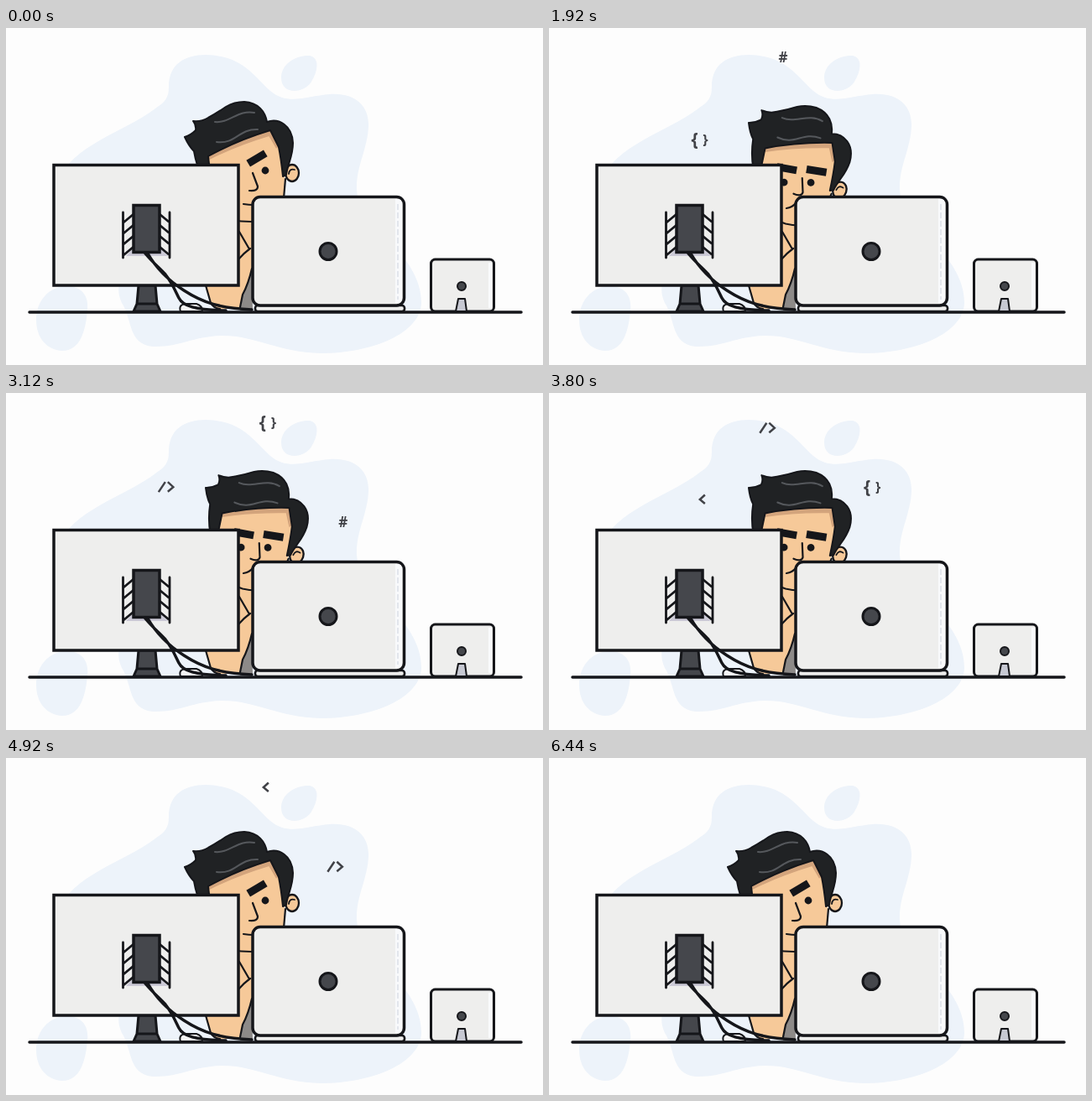
An HTML page for the animation above (6.48 s loop, 640x402 px).

```html
<!DOCTYPE html>
<html lang="en">
<head>
<meta charset="utf-8">
<title>Coding at the desk</title>
<style>
  html, body { margin: 0; width: 100%; height: 100%; overflow: hidden; background: #fdfdfd; }
  svg { display: block; width: 100%; height: 100%; }
  .blob { fill: #edf3fa; }
  .ink { stroke: #15161a; stroke-width: 3.5; stroke-linejoin: round; stroke-linecap: round; }
  .sharp { stroke-linejoin: miter; }
  .line { fill: none; stroke-width: 2.2; }
  .thin { stroke-width: 2; }
  .panel { fill: #eeeeed; }
  .dark { fill: #45474c; }
  .skin { fill: #f6c999; }
  .hair { fill: #202224; stroke-width: 2; }
  .strand { fill: none; stroke: #55585c; stroke-width: 2; stroke-linecap: round; }
  .symbol { fill: #414247; font: bold 17px "Open Sans", sans-serif; text-anchor: middle; }
  .symbol path { fill: none; stroke: #414247; stroke-width: 2.5; }
  .symbol .open { font-size: 21px; }
  .symbol .close { font-size: 16px; }
</style>
</head>
<body>
<svg viewBox="0 0 640 402">
  <g class="blob">
    <path d="M194 70C194 43 213 32 238 32C282 33 295 57 315 75C336 93 358 81 386 79C416 77 433 93 432 117C431 145 417 165 418 193C420 236 495 268 495 328C494 364 437 388 375 388C325 387 298 367 258 367C222 368 207 381 175 380C145 377 151 348 138 328C125 300 150 285 140 260L60 185C80 138 140 125 178 96C190 88 194 83 194 70Z"/>
    <path d="M328 59C328 42 347 32 362 33C375 36 371 53 364 64C356 78 328 81 328 59Z"/>
    <path d="M36 348C36 325 52 308 72 308C91 308 99 320 97 337C95 360 89 385 67 385C48 384 36 369 36 348Z"/>
  </g>

  <path id="route" d="M164 180C185 90 250 33 292 33C350 33 388 92 422 222" fill="none"/>
  <g class="symbol"><text y="6">#</text></g>
  <g class="symbol"><text class="open" x="-6" y="6">{</text><text class="close" x="7" y="5">}</text></g>
  <g class="symbol"><path d="M-9 6L-1-6M2-6L8.500 0L2 5.500"/></g>
  <g class="symbol"><path d="M3-5.500L-3 0L3 5"/></g>

  <!-- body -->
  <path class="skin" d="M239 300V308L244 328Q247 334 255 335H293V205H265Z"/>
  <path d="M293 290Q289 306 282 319L279 337H294Z" fill="#8d8a88"/>
  <path class="ink line" d="M238 307L244 328Q247 334 255 335M293 287Q289 305 282 318L279 333M278 243L289 262M291 263Q284 268 277 276"/>

  <g id="head">
    <ellipse class="skin ink" cx="341" cy="173" rx="8" ry="10" style="stroke-width:2.3"/>
    <path class="ink line" d="M337 174Q338 167 344 169" style="stroke-width:1.8"/>
    <path class="skin" d="M236 145L240 200Q245 228 272 230H292Q326 228 331 203L334 130L310 118Z"/>
    <path class="ink line" d="M333 180L331 203Q326 228 292 231Q280 231 268 229"/>
    <path d="M241 154Q272 138 315 125L325 142" fill="none" stroke="#d3a47c" stroke-width="7"/>
    <path class="hair ink" d="M213 130Q220 128 226 122Q227 116 223 111Q233 112 241 107Q252 101 262 94Q272 88 284 88C301 89 309 100 311 112C325 107 341 116 342 137C342 153 336 161 334 175L330 177Q328 157 325 142L315 122Q275 134 241 153L244 180H235Q227 165 224 147Q218 141 213 130Z"/>
    <path class="strand" d="M249 112C266 114 277 97 296 101M251 136C274 139 277 120 300 121"/>
    <rect id="browLeft" x="-12" y="-4.500" width="24" height="9" fill="#15161a"/>
    <rect id="browRight" x="-12" y="-4.500" width="24" height="9" fill="#15161a"/>
    <circle id="eyeLeft" r="4.400" fill="#15161a"/>
    <circle id="eyeRight" r="4.400" fill="#15161a"/>
    <path class="ink line" d="M294 173L300 189Q300 195 290 194"/>
  </g>
  <path id="mouth" class="ink line"/>

  <!-- mouse and monitor -->
  <path class="ink thin" d="M208 338Q205 329 216 329H227Q234 331 234 338Z" fill="#f6f6f6"/>
  <path class="dark ink" d="M158 307H178L180 329H156ZM156 329H180L184 338H152Z" style="stroke-width:3"/>
  <rect class="panel ink sharp" x="57" y="163.500" width="220" height="143.500"/>
  <path d="M143 272H193L183 262H152Z" fill="#cbc9d6"/>
  <path id="rails" class="ink" fill="none" style="stroke-width:2.8"/>
  <rect class="dark ink sharp" x="152" y="211.500" width="31" height="56"/>
  <path class="ink" fill="none" d="M166 269C176 281 184 287 190 294C198 304 202 314 206 322C211 332 225 336 262 337M169 269C178 285 192 300 212 313C235 328 255 334 293 336"/>

  <!-- laptop -->
  <rect class="panel ink" x="297" y="331" width="178" height="7" rx="3" style="stroke-width:2.6"/>
  <rect class="panel ink" x="294" y="201.500" width="180.500" height="129.500" rx="9"/>
  <path d="M464 204H467Q472 204 472 211V321Q472 328 467 328H464Z" fill="#f8f9fb"/>
  <path d="M467 210V324" stroke="#cdd2de" stroke-dasharray="7 3"/>
  <circle class="dark ink" cx="384" cy="266.500" r="10" style="stroke-width:3"/>

  <!-- tablet -->
  <rect class="panel ink" x="506.500" y="276" width="75" height="62" rx="5" style="stroke-width:3"/>
  <path d="M577 280V334" stroke="#f9fafc" stroke-width="4"/>
  <circle class="dark ink thin" cx="543" cy="308" r="5"/>
  <path class="ink thin" d="M539 323H547L549 338H536Z" fill="#c6c8d2"/>
  <path class="ink" d="M28 339H614"/>
</svg>
<script>
const LOOP = 6480, STEP = 40, TRAVEL = 3300;
const starts = [460, 1465, 2460, 3278];
const get = id => document.getElementById(id);
const place = (el, x, y, angle = 0) =>
  el.setAttribute('transform', `translate(${x} ${y}) rotate(${angle})`);
const clamp = u => Math.min(1, Math.max(0, u));
const smooth = u => u * u * (3 - 2 * u);

const symbols = document.querySelectorAll('.symbol');
const route = get('route'), routeLength = route.getTotalLength();

let rails = 'M139.5 220V274M195 220V274';
for (let y = 222; y < 265; y += 13) rails += `M152 ${y}L140 ${y + 10}M183 ${y}L195 ${y + 10}`;
get('rails').setAttribute('d', rails);

function drawHead(turn) {
  const look = 1 - (1 - turn) ** 2; // the face leads the tilt
  get('head').setAttribute('transform', `rotate(${18 * turn} 279 200.5)`);
  place(get('browLeft'), 262 + 11 * look, 176 - 8 * look, 20 - 28 * look);
  place(get('browRight'), 299 + 8.5 * look, 155.5 + 4 * look, -31 + 22 * look);
  place(get('eyeLeft'), 268 + 7 * look, 180 + 4.6 * look);
  place(get('eyeRight'), 309 - 3.5 * look, 170 + 5 * look);
  get('mouth').setAttribute('d', `M283 ${210 + 5 * look}Q290 ${211 + 3 * look} 294 ${211 - 2 * look}`);
}

function draw(t) {
  drawHead(smooth(clamp((t - 1200) / 700)) - smooth(clamp((t - 4200) / 700)));
  symbols.forEach((symbol, i) => {
    const u = (t - starts[i]) / TRAVEL;
    symbol.style.display = u > 0 && u < 1 ? '' : 'none';
    const eased = clamp(u) - 0.04 * Math.sin(2 * Math.PI * clamp(u));
    const { x, y } = route.getPointAtLength(eased * routeLength);
    place(symbol, x, y);
  });
}

const begin = performance.now();
function tick() {
  const t = (performance.now() - begin) % LOOP;
  draw(Math.floor(t / STEP) * STEP);
  requestAnimationFrame(tick);
}
tick();
</script>
</body>
</html>
```
